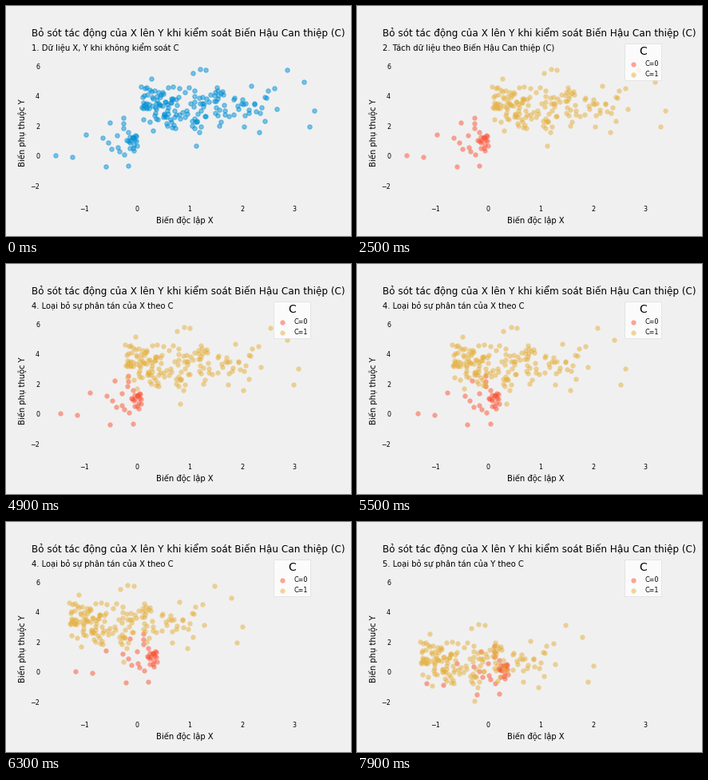
A matplotlib script for the animation above (8 s loop, 432x288 px).

```python
import numpy as np
import matplotlib.pyplot as plt
from matplotlib.animation import FuncAnimation

W, H, DPI = 432, 288, 72
STEP = 100  # ms per tick
BG, BLUE, RED, GOLD = "#f0f0f0", "#008fd5", "#fc4f30", "#e5ae38"
X0, Y0, SX, SY = 164, 187.6, 65.8, 18.75  # stage position of (0, 0), pixels per unit
XLIM, YLIM = (-1.8, 3.63), (-3.14, 6.19)

TITLE = "Bỏ sót tác động của X lên Y khi kiểm soát Biến Hậu Can thiệp (C)"
STAGES = [
    (0, "1. Dữ liệu X, Y khi không kiểm soát C"),
    (500, "2. Tách dữ liệu theo Biến Hậu Can thiệp (C)"),
    (4500, "4. Loại bỏ sự phân tán của X theo C"),
    (6500, "5. Loại bỏ sự phân tán của Y theo C"),
]

rng = np.random.default_rng(7)


def cloud(n, x_span, x_shape, y_span, y_shape, extremes):
    """Random points inside two spans, plus the few that lie far out."""
    x = x_span[0] + np.ptp(x_span) * rng.beta(*x_shape, n)
    y = y_span[0] + np.ptp(y_span) * rng.beta(*y_shape, n)
    if x_span[0] < 0:
        x = x_span[0] + x_span[1] - x
    return np.vstack([np.column_stack([x, y]), extremes])


low = cloud(29, (-0.8, 0.02), (1.1, 2.2), (-0.1, 2.8), (1.8, 2.2),
            [(-1.55, 0.05), (-1.23, -0.05), (-0.98, 1.4), (-0.6, -0.7), (-0.16, -0.65)])
high = cloud(157, (0.06, 3.0), (1.1, 2.1), (1.4, 4.75), (2.3, 1.8),
             [(0.27, 5.17), (1.06, 5.52), (1.2, 5.78), (1.31, 5.73), (2.85, 5.76),
              (3.17, 4.93), (3.38, 3.02), (3.28, 1.95), (1.12, 0.67)])

# Group means, removed along x and then along y
LOW_MEAN, HIGH_MEAN = np.array([-0.38, 1.06]), np.array([1.375, 3.36])

plt.rcParams.update({"font.family": "DejaVu Sans", "font.size": 14})
fig = plt.figure(figsize=(W / DPI, H / DPI), dpi=DPI, facecolor=BG)
ax = fig.add_axes([
    (X0 + SX * XLIM[0]) / W, 1 - (Y0 - SY * YLIM[0]) / H,
    SX * np.ptp(XLIM) / W, SY * np.ptp(YLIM) / H,
])
ax.set(xlim=XLIM, ylim=YLIM, xticks=range(-1, 4), yticks=range(-2, 7, 2), facecolor=BG)
ax.spines[:].set_visible(False)
ax.tick_params(length=0, pad=3.5, labelsize=8)
ax.set_xlabel("Biến độc lập X", fontsize=10)
ax.set_ylabel("Biến phụ thuộc Y", fontsize=10)
ax.text(-2, 8, TITLE, fontsize=12)
caption = ax.text(-2, 7, "", fontsize=10)


def dots(points, color, name):
    return ax.scatter(*points.T, s=40, color=color, alpha=0.5, linewidth=0, label=name)


low_dots = dots(low, RED, "C=0")
high_dots = dots(high, GOLD, "C=1")
legend = ax.legend(
    title="C", fontsize=8, title_fontsize=14, loc="upper right", borderaxespad=0,
    bbox_to_anchor=(3.3, 7.5), bbox_transform=ax.transData,
)
legend.get_frame().set_linewidth(0.5)


def progress(t, start):
    """Ten equal poses from 0 to 1, one every 200 ms."""
    return np.clip((t - start) // 200, 0, 9) / 9


def update(i):
    t = i * STEP
    split = t >= 500
    done = np.array([progress(t, 4500), progress(t, 6500)])
    caption.set_text([text for start, text in STAGES if t >= start][-1])
    legend.set_visible(split)
    groups = (low_dots, low, LOW_MEAN, RED), (high_dots, high, HIGH_MEAN, GOLD)
    for group, points, mean, color in groups:
        group.set_color(color if split else BLUE)
        group.set_linewidth(0 if split else 1)
        group.set_sizes([40 if split else 30])
        group.set_offsets(points - mean * done)
    return caption, legend, low_dots, high_dots


anim = FuncAnimation(fig, update, frames=80, interval=STEP, repeat=True, repeat_delay=0)
plt.show()
```
